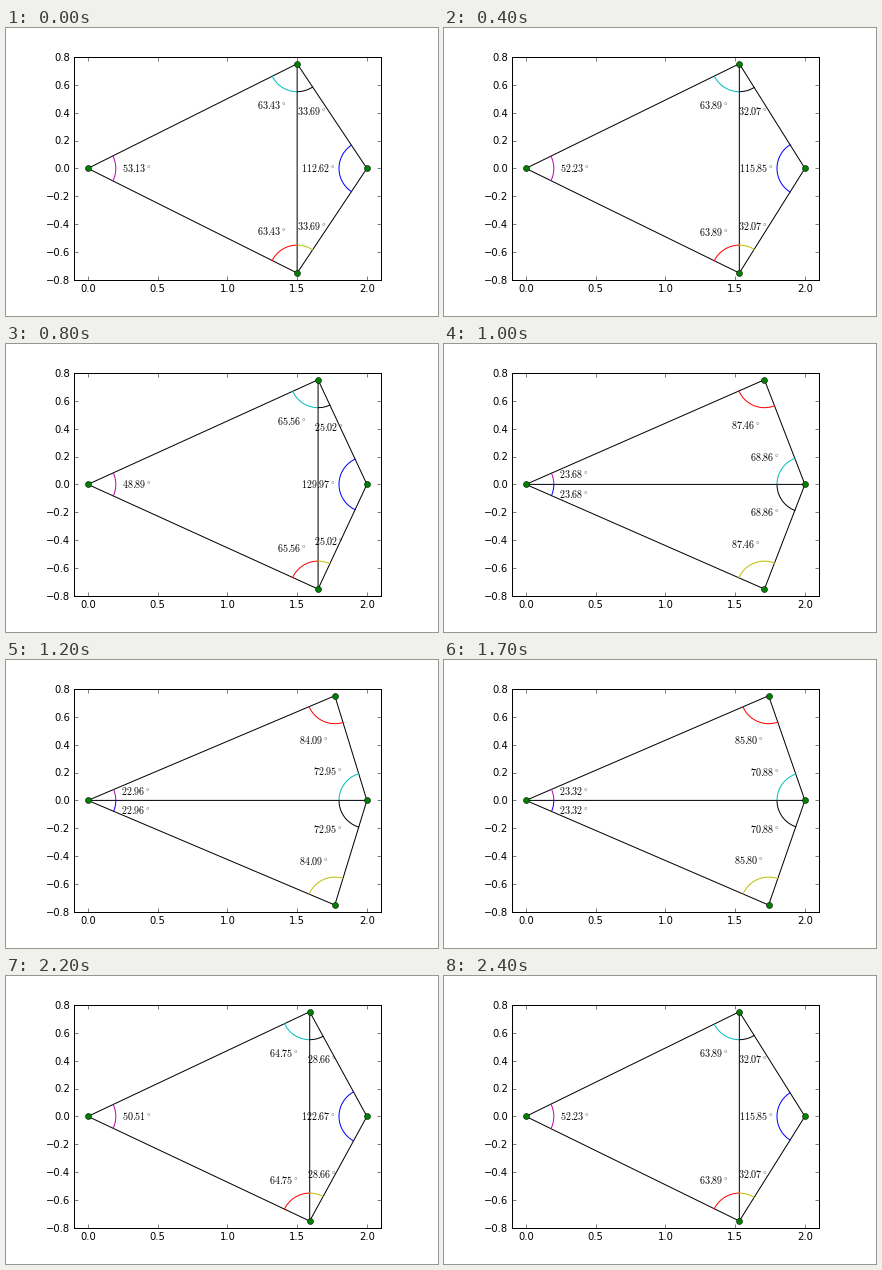
These frames come from a looping animation (432x288 px, 2500 ms). A matplotlib script:

```python
import numpy as np
import matplotlib.pyplot as plt
from matplotlib.animation import FuncAnimation

plt.rcParams.update({
    "font.family": "DejaVu Sans",
    "font.size": 10,
    "mathtext.fontset": "cm",
    "text.hinting": "auto",
    "lines.linewidth": 1.0,
    "lines.markeredgewidth": 0.5,
    "axes.linewidth": 1.0,
})
for axis in ("xtick", "ytick"):
    plt.rcParams.update({
        f"{axis}.direction": "in",
        f"{axis}.major.size": 4,
        f"{axis}.major.width": 0.5,
        f"{axis}.major.pad": 4,
        f"{axis}.labelsize": 10,
    })

HALF = 0.75        # half height of the kite
WIDTH = 2.0        # length of the kite's axis
ARC_R = 0.2
LABEL_R = 0.35
COLORS = "rcmykb"

# The waist steps out, rests, then steps back.
OUT = [0] * 4 + list(range(1, 9))
STEPS = OUT + [9] * 5 + list(range(8, 0, -1))

fig = plt.figure(figsize=(6, 4), dpi=72, facecolor="white")
fig.subplots_adjust(left=0.125, right=0.9, bottom=0.125, top=0.9)
ax = fig.add_subplot()
ax.set_aspect("equal")
ax.set_xlim(-0.1, 2.1)
ax.set_ylim(-0.8, 0.8)
ax.set_xticks(np.arange(0, 2.1, 0.5))
ax.set_yticks(np.linspace(-0.8, 0.8, 9))
ax.tick_params(top=True, right=True)

edges, = ax.plot([], [], "k-")
dots, = ax.plot([], [], "o", color="g", mec="k", ms=6)
arcs = [ax.plot([], [], color=c)[0] for c in COLORS]
labels = [ax.text(0, 0, "", ha="center", va="center") for _ in COLORS]


def triangles(x):
    """Delaunay triangles of the kite whose waist is at x."""
    left, right = (0, 0), (WIDTH, 0)
    top, bottom = (x, HALF), (x, -HALF)
    if x * (WIDTH - x) > HALF ** 2:
        return (bottom, top, left), (bottom, top, right)
    return (top, right, left), (bottom, right, left)


def corner(tri, i):
    """Vertex, start direction and signed opening of one corner."""
    p, q, r = (np.array(tri[(i + k) % 3]) for k in range(3))
    a, b = (np.arctan2(*(v - p)[::-1]) for v in (q, r))
    return p, a, (b - a + np.pi) % (2 * np.pi) - np.pi


def polar(p, radius, angle):
    return p[0] + radius * np.cos(angle), p[1] + radius * np.sin(angle)


def draw(n):
    x = 1.5 + 0.03 * STEPS[n]
    tris = triangles(x)
    sides = {tuple(sorted((t[i], t[i - 1]))) for t in tris for i in range(3)}
    gap = (np.nan, np.nan)
    edges.set_data(*np.array([p for s in sorted(sides) for p in (*s, gap)]).T)
    dots.set_data([0, x, x, WIDTH], [0, HALF, -HALF, 0])

    corners = [corner(t, i) for t in tris for i in range(3)]
    for (p, a, turn), arc, label in zip(corners, arcs, labels):
        arc.set_data(*polar(p, ARC_R, a + np.linspace(0, turn, 50)))
        label.set_position(polar(p, LABEL_R, a + turn / 2))
        label.set_text(rf"${np.degrees(abs(turn)):.2f}^\circ$")
    return [edges, dots, *arcs, *labels]


anim = FuncAnimation(fig, draw, frames=len(STEPS), interval=100,
                     init_func=lambda: draw(0), repeat=True)
plt.show()
```
